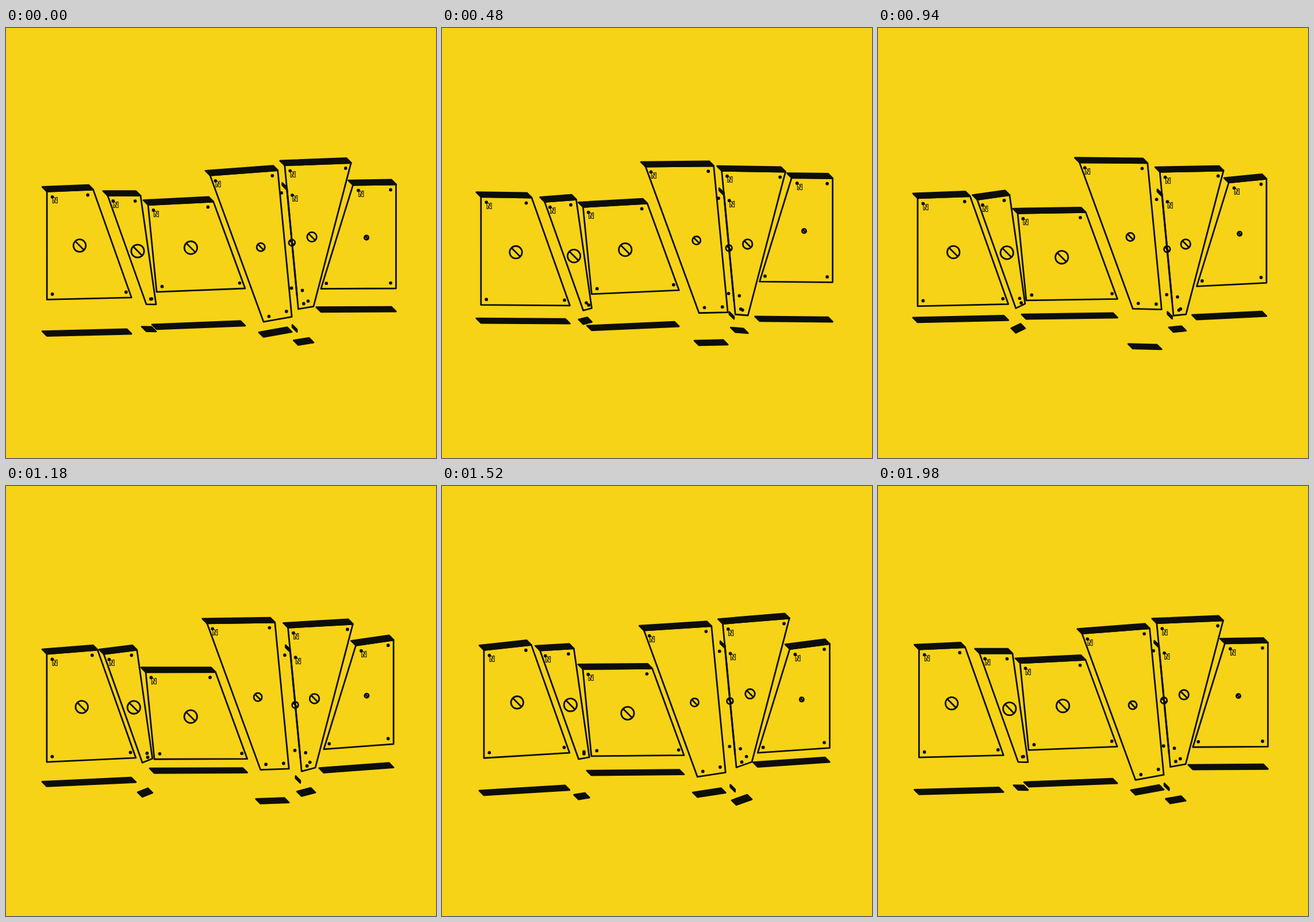
An HTML page that plays this animation: 748 px wide and 748 px high, repeating every 2 s.

```html
<!DOCTYPE html>
<html lang="en">
<head>
<meta charset="utf-8">
<title>Swaying panels</title>
<style>
  html, body { margin: 0; width: 100%; height: 100%; overflow: hidden; background: #f6d317; }
  svg { display: block; width: 100vw; height: 100vh; }
  path { stroke: #0d0d0a; stroke-width: 2.8; stroke-linejoin: round; stroke-linecap: round; fill: none; }
  .bars { fill: #0d0d0a; }
  .dots { stroke-width: 5.8; }
  text {
    font: bold 12px "Liberation Sans", Arial, sans-serif;
    text-anchor: middle;
    fill: #f6d317; stroke: #0d0d0a; stroke-width: 2.1; paint-order: stroke;
  }
</style>
</head>
<body>
<svg id="stage" viewBox="0 0 748 748"></svg>
<script>
const LOOP = 2000, STEP = 20;
const DEPTH = 8;    // slant of the black faces
const INSET = 9.4;  // distance of the rivets from the corners

// An edge has a fixed run [dx, dy] from top to bottom; its lower end
// sways as mean + cos + sin on each axis.
const edge = (run, x, y) => ({ run, x, y });
const panel = (screw, phase, left, right) => ({ screw, phase, left, right });

const panels = [
  panel(10.8, 46,
    edge([0, 188], [70.32, .87, -2.58], [477.81, -5.4, 4.21]),
    edge([66.6, 187.8], [222.48, -4.23, .31], [473.78, -4.88, 9.32])),
  panel(11.2, 90,
    edge([67.2, 189], [241.52, 2.58, 4.06], [483.35, -2.75, 8.12]),
    edge([27, 189.2], [258.23, 2.81, 2.06], [479.59, 1.31, 7.8])),
  panel(11.2, -40,
    edge([15, 151.5], [259.99, 2.12, .22], [466.84, -7.76, -3.49]),
    edge([55.2, 151], [416.64, -.72, -4.38], [462.89, -9.91, -6.21])),
  panel(7.1, -153,
    edge([93, 254.7], [445.55, 2.45, 1.37], [500.14, 10.94, -5.08]),
    edge([24.5, 254.7], [495.07, 2.12, 1.93], [496.09, 6.21, -1.94])),
  panel(8.3, 48,
    edge([23.7, 250], [511.34, -2.85, -.91], [494.23, -5.31, 4.37]),
    edge([-65.3, 250], [535.67, -.72, -3.41], [490.38, -5.89, 10.02])),
  // a sliver without width, lying on the left edge of the panel before it
  panel(5.4, 48,
    edge([17.5, 184.5], [508.94, -2.85, -.91], [471.2, -5.31, 4.37]),
    edge([17.5, 184.5], [508.94, -2.85, -.91], [467.2, -5.31, 4.37])),
  panel(3.7, -107,
    edge([-55.7, 180.5], [551.04, -3.17, 1.65], [452.54, 1.01, -11.54]),
    edge([0, 181], [676.86, 1.57, 2.56], [448.76, 4.22, -6.71]))
];

const stage = document.getElementById("stage");
function add(name, cls) {
  const el = document.createElementNS("http://www.w3.org/2000/svg", name);
  if (cls) el.setAttribute("class", cls);
  return stage.appendChild(el);
}

for (const p of panels) {
  p.bars = add("path", "bars");
  p.lines = add("path");
  p.label = add("text");
  p.label.textContent = "N";
  p.dots = add("path", "dots");
}

const shift = ([x, y], dx, dy) => [x + dx, y + dy];
const poly = pts => "M" + pts.map(([x, y]) => x.toFixed(2) + " " + y.toFixed(2)).join("L") + "Z";
const dot = ([x, y]) => `M${x} ${y}h.01`;
const bar = (a, b) => poly([a, b, shift(b, -DEPTH, -DEPTH), shift(a, -DEPTH, -DEPTH)]);

function screwPath(x, y, r) {
  const d = r * Math.SQRT1_2;
  return `M${x - r} ${y}a${r} ${r} 0 1 0 ${2 * r} 0a${r} ${r} 0 1 0 ${-2 * r} 0` +
         `M${x - d} ${y - d}l${2 * d} ${2 * d}`;
}

function draw(time) {
  const angle = time / LOOP * 2 * Math.PI;
  const cos = Math.cos(angle), sin = Math.sin(angle);
  const sway = ([mean, c, s]) => mean + c * cos + s * sin;
  const ends = e => {
    const low = [sway(e.x), sway(e.y)];
    return [shift(low, -e.run[0], -e.run[1]), low];
  };

  for (const p of panels) {
    const [tl, bl] = ends(p.left);
    const [tr, br] = ends(p.right);
    const drop = 47 + 23.2 * Math.cos(angle + p.phase * Math.PI / 180);
    const cx = (tl[0] + tr[0] + bl[0] + br[0]) / 4;
    const cy = (tl[1] + tr[1] + bl[1] + br[1]) / 4 + 1.8;

    p.bars.setAttribute("d", bar(tl, tr) + bar(shift(bl, 0, drop), shift(br, 0, drop)));
    p.lines.setAttribute("d", poly([tl, tr, br, bl]) + screwPath(cx, cy, p.screw));
    p.dots.setAttribute("d",
      dot(shift(tl, INSET, INSET)) + dot(shift(tr, -INSET, INSET)) +
      dot(shift(br, -INSET, -INSET)) + dot(shift(bl, INSET, -INSET)));
    p.label.setAttribute("x", tl[0] + 14.2);
    p.label.setAttribute("y", tl[1] + 20);
  }
}

const start = performance.now();
function frame() {
  const time = (performance.now() - start) % LOOP;
  draw(Math.floor(time / STEP) * STEP);
  requestAnimationFrame(frame);
}
frame();
</script>
</body>
</html>
```
